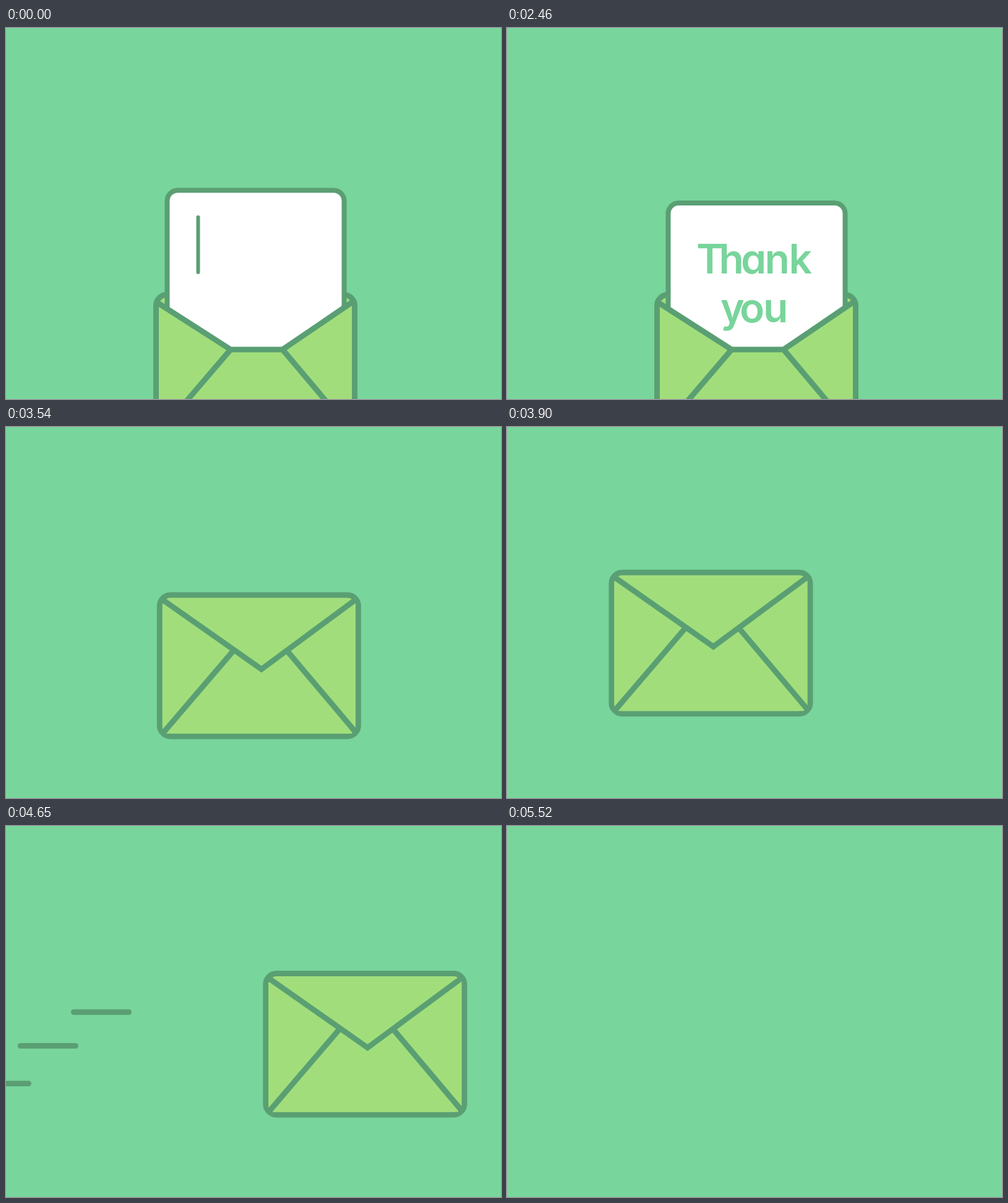
An HTML page that plays this animation: 800x600 px, repeating every 7200 ms.

```html
<!DOCTYPE html>
<html lang="en">
<head>
<meta charset="utf-8">
<title>Thank you</title>
<style>
  html, body { margin: 0; width: 100%; height: 100%; overflow: hidden; background: #78d59b; }
  svg { display: block; width: 100vw; height: 100vh; }
  .ink { fill: none; stroke: #5a9f73; stroke-width: 9; }
  .lime { fill: #a1de7b; }
  .round { stroke-linecap: round; }
  text { font: 600 66px Inter, sans-serif; font-feature-settings: "cv11"; fill: #78d59b; }
</style>
</head>
<body>
<svg viewBox="0 0 800 600">
  <defs><path id="route" d="M238 427C229 250 290 190 154 234"/></defs>
  <g id="streaks" class="ink round">
    <path d="M380.500 301h89"/>
    <path d="M294.500 355.500h89"/>
    <path d="M218.500 416.500h89"/>
  </g>
  <g id="envelope">
    <path id="flapBack" class="ink lime"/>
    <rect class="ink lime" x="4.500" y="4.500" width="321" height="228.500" rx="17.500"/>
    <g id="letterHolder" transform="translate(-238 -427)">
      <g id="letter">
        <rect class="ink" x="260.500" y="262.500" width="286" height="320" rx="17" style="fill:#fff;stroke-width:8"/>
        <text id="top" y="376" x="306 342.500 378 416.500 455.500"></text>
        <text id="bottom" y="455" x="345 376 414"></text>
        <path id="caret" class="ink round" d="M0 306V395" style="stroke-width:6"/>
      </g>
    </g>
    <path class="lime" d="M9 19L125 93H209L321 16V222L315 228.500H15L9 222Z"/>
    <path class="ink" d="M125 93L10 227.500M209 93L321 226"/>
    <path id="pocket" class="ink" d="M8 18L125 93H209L322 16"/>
    <path id="flapFront" class="ink lime"/>
  </g>
</svg>
<script>
const LOOP = 7200, FRAME = 30;
const TYPE_AT = 570, KEY_MS = 82.5, BLINK = 150;
const MOVE_AT = 2910, BRAKE_AT = 3660, TURN_AT = 4140;
const $ = id => document.getElementById(id);
const clamp = v => Math.max(0, Math.min(1, v));
const span = (t, a, b) => clamp((t - a) / (b - a));
const show = (el, on) => el.setAttribute("display", on ? "inline" : "none");
const shift = (el, x, y) => el.setAttribute("transform", `translate(${x} ${y})`);

const route = $("route"), routeLength = route.getTotalLength();
const message = "Thank\nyou";
// Caret x after each key, starting before the first one.
const caretX = [310.5, 345.5, 379, 417, 456, 490.5, 348, 378, 416, 451.5];

function caretOn(t) {
  if (t < TYPE_AT) return t < 90 || (t >= 240 && t < 390);
  return t < 1320 && Math.floor((t - TYPE_AT) / BLINK) % 2 === 0;
}

function drawLetter(t) {
  const keys = t < TYPE_AT ? 0 : Math.min(message.length, 1 + Math.floor((t - TYPE_AT) / KEY_MS));
  const [first, second = ""] = message.slice(0, keys).split("\n");
  $("top").textContent = first;
  $("bottom").textContent = second;
  show($("caret"), caretOn(t));
  shift($("caret"), caretX[keys], keys > 5 ? 87 : 0);
  shift($("letter"), 0, 270 * span(t, 2400, 2700) ** 1.6);
  show($("letter"), t < 2700);
}

function drawFlap(t) {
  const turn = 2 * span(t, MOVE_AT, 3030) - 1;
  const d = `M9 12L169 ${12 + 112.5 * turn}L321 12`;
  $("flapBack").setAttribute("d", d);
  $("flapFront").setAttribute("d", d);
  show($("flapBack"), turn < 0);
  show($("flapFront"), turn >= 0);
  show($("pocket"), turn < 1);
}

function place(t) {
  if (t >= TURN_AT) return { x: 154 + 50 * ((t - TURN_AT) / 270) ** 2.6, y: 234 };
  const rise = 0.735 * span(t, MOVE_AT, BRAKE_AT) ** 1.6;
  const settle = 0.265 * (1 - (1 - span(t, BRAKE_AT, TURN_AT)) ** 2.8);
  return route.getPointAtLength(routeLength * (rise + settle));
}

function draw(t) {
  drawLetter(t);
  drawFlap(t);
  const p = place(t);
  shift($("envelope"), p.x, p.y);
  show($("envelope"), p.x < 810);
  shift($("streaks"), (t - 4920) * 1.004, 0);
  show($("streaks"), t > 4400 && t < 5520);
}

const start = performance.now();
function tick() {
  const t = (performance.now() - start) % LOOP;
  draw(Math.floor(t / FRAME) * FRAME);
  requestAnimationFrame(tick);
}
tick();
</script>
</body>
</html>
```
